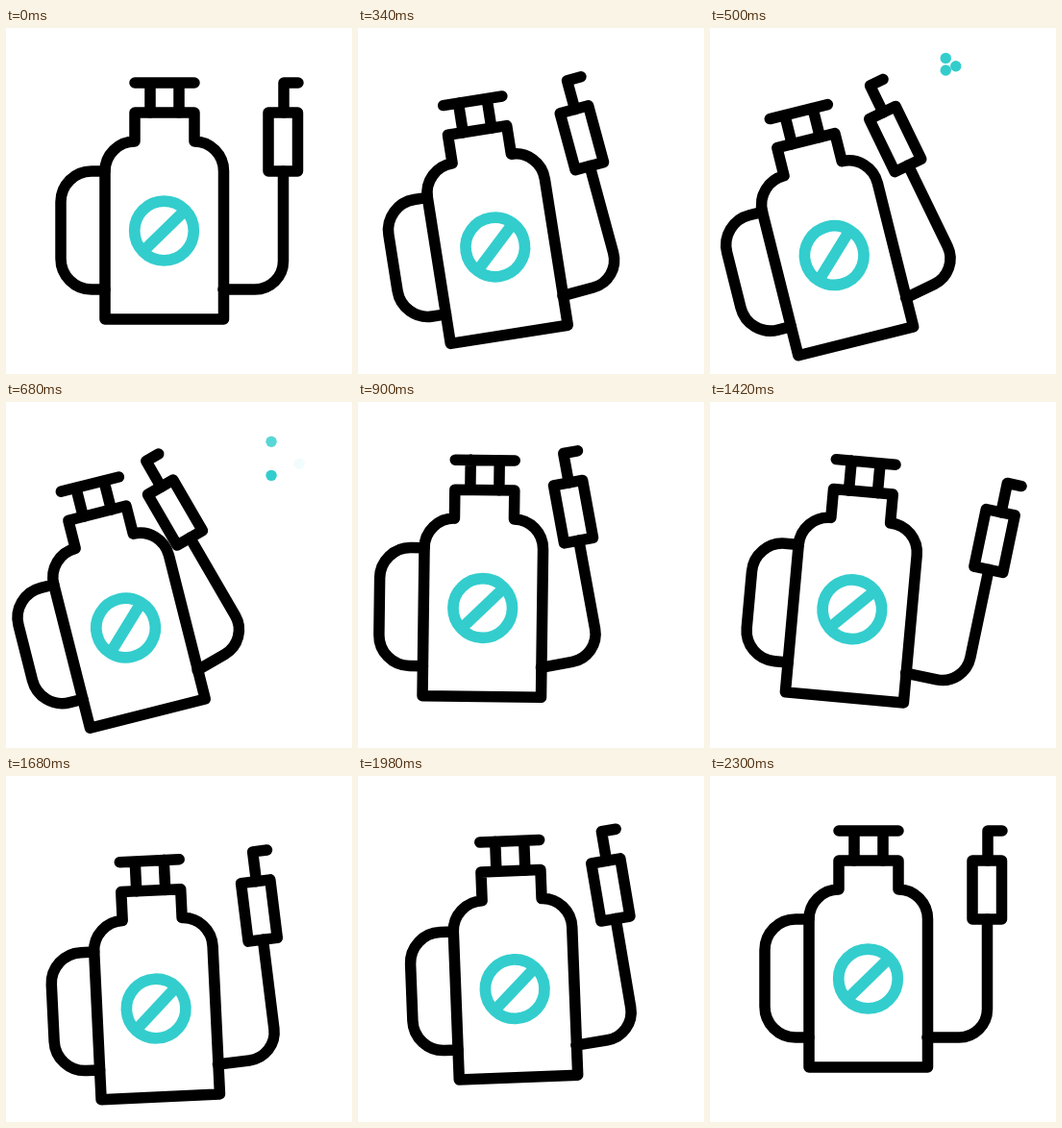
Animation, 360 px wide and 360 px high, one loop 2400 ms. Source, as an HTML page:

```html
<!DOCTYPE html>
<html lang="en">
<head>
<meta charset="utf-8">
<title>Sprayer</title>
<style>
html, body { margin: 0; width: 100%; height: 100%; overflow: hidden; background: #fff; }
svg { display: block; width: 100vw; height: 100vh; }
.ink { fill: none; stroke: #000; stroke-width: 11.5; stroke-linecap: round; stroke-linejoin: round; }
.sign { fill: none; stroke: #33cdcd; stroke-width: 11.7; }
.drop { fill: #33cdcd; }
</style>
</head>
<body>
<svg viewBox="0 0 360 360">
  <g id="drops"></g>
  <g id="tank">
    <g id="gun" class="ink">
      <path d="M226 272H259A29.5 29.5 0 0 0 288.5 242.5V149"/>
      <path d="M273 88H303.5V149H273Z"/>
      <path d="M289 88V57H304"/>
    </g>
    <g class="ink">
      <path d="M103 149H89A32 32 0 0 0 57 181V240A32 32 0 0 0 89 272H103"/>
      <path d="M103 303V149A31 31 0 0 1 134 118V88H196V118A30.5 31 0 0 1 226.5 149V303Z"/>
      <path d="M134 57H196M150 57V88M180 57V88"/>
    </g>
    <g class="sign">
      <circle cx="164.5" cy="211" r="30.8"/>
      <path d="M143 232L186 190"/>
    </g>
  </g>
</svg>
<script>
const LOOP = 2400, GRAVITY = 0.0017;
const $ = id => document.getElementById(id);
const ease = u => (1 - Math.cos(Math.PI * u)) / 2;

// Swings from one [time, value] turning point to the next.
function sway(...turns) {
  return t => {
    const i = turns.findIndex(p => p[0] > t);
    if (i < 1) return 0;
    const [t0, v0] = turns[i - 1], [t1, v1] = turns[i];
    return v0 + (v1 - v0) * ease((t - t0) / (t1 - t0));
  };
}

const shiftX = sway([0, 0], [650, -37.5], [2130, 0]);
const shiftY = sway([0, 0], [580, 26.5], [1195, -16.5], [1680, 31], [2180, 0]);
const tilt = sway([0, 0], [615, -15.3], [1120, 11.3], [1808, -4], [2180, 0]);
const swing = sway([40, 0], [750, -16.3], [1260, 9.5], [1880, -8.5], [2300, 0]);

const jets = [
  { vx: 0.171, vy: -0.27, life: 330 },
  { vx: 0.171, vy: -0.145, life: 360 },
  { vx: 0.275, vy: -0.188, life: 285 }
];
const sprays = [
  { start: 400, x: 228, y: 50, speed: 1, span: 1 },
  { start: 1080, x: 321, y: 85, speed: 0.7, span: 0.6 }
];
const drops = sprays.flatMap(s => jets.map(j => {
  const el = document.createElementNS("http://www.w3.org/2000/svg", "circle");
  el.setAttribute("class", "drop");
  el.setAttribute("r", 5.7);
  $("drops").append(el);
  return { el, s, j };
}));

function moveDrop({ el, s, j }, t) {
  const age = t - s.start, left = j.life * s.span - age;
  el.setAttribute("opacity", Math.max(0, Math.min(1, age / 70, left / 60)));
  el.setAttribute("cx", s.x + j.vx * s.speed * age);
  el.setAttribute("cy", s.y + j.vy * s.speed * age + GRAVITY * age * age / 2);
}

function draw(t) {
  $("tank").setAttribute("transform",
    `translate(${shiftX(t)} ${shiftY(t)}) rotate(${tilt(t)} 164.5 221)`);
  $("gun").setAttribute("transform", `rotate(${swing(t)} 226 272)`);
  drops.forEach(d => moveDrop(d, t));
}

const begin = performance.now();
function tick() {
  draw((performance.now() - begin) % LOOP);
  requestAnimationFrame(tick);
}
tick();
</script>
</body>
</html>
```
